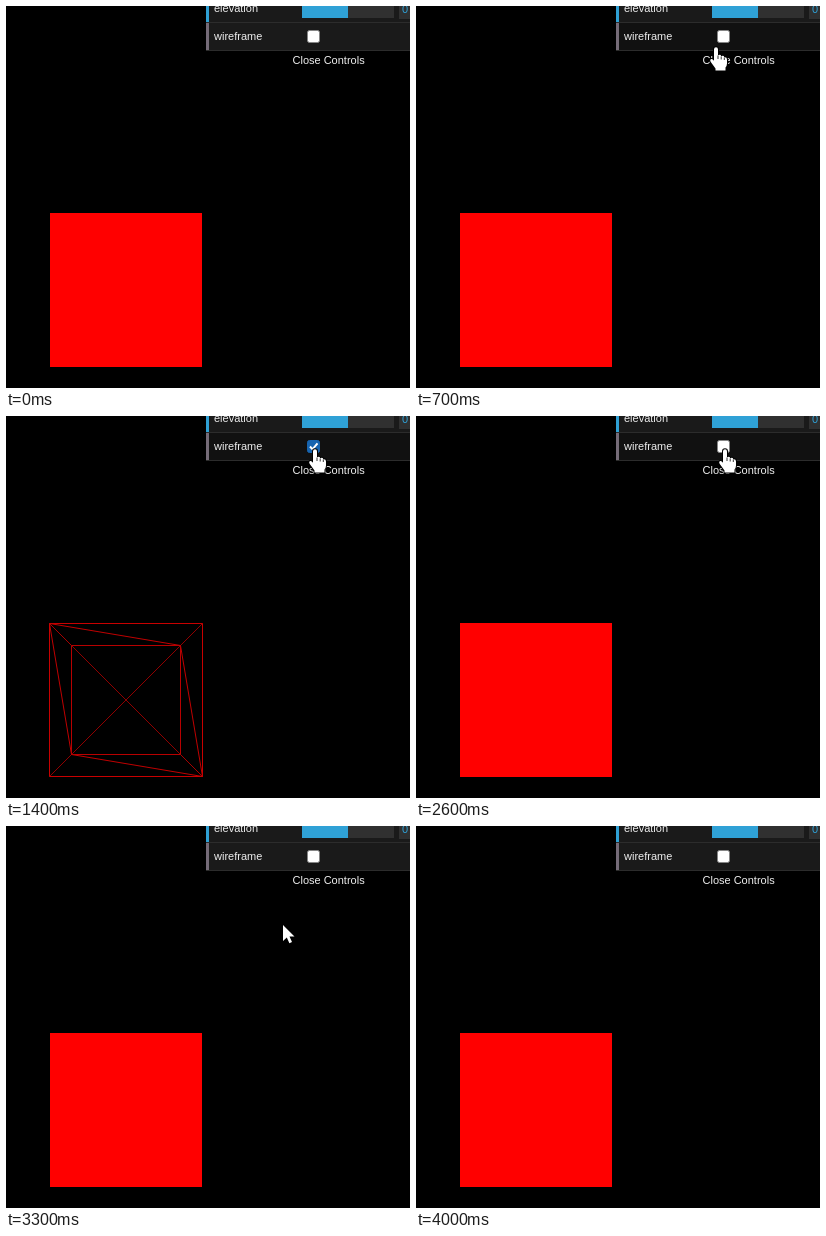
Recreate the animation shown at these times as an HTML page with a canvas. Size 404 by 382 pixels, loop 4.2 s.

```html
<!DOCTYPE html>
<html lang="en">
<head>
<meta charset="utf-8">
<title>Wireframe toggle</title>
<style>
html, body { margin: 0; width: 100%; height: 100%; overflow: hidden; background: #000; }
canvas { display: block; }
</style>
</head>
<body>
<canvas id="stage" width="404" height="382"></canvas>
<script>
const ctx = document.getElementById('stage').getContext('2d');
const LOOP = 4200, STEP = 100;
const CHECK_ON = 1400, CHECK_OFF = 2600;

// Pointer path: time, x, y of the hotspot
const path = [
  [100, 250, 335], [300, 272, 205], [500, 292, 90], [600, 298, 56],
  [700, 300, 42], [900, 304, 37], [1100, 307, 34], [1300, 307, 34],
  [1400, 309, 34], [2900, 309, 34], [3000, 306, 40], [3100, 298, 56],
  [3300, 277, 99], [3500, 260, 150], [3700, 245, 230], [3900, 233, 350]
];

const hand = new Path2D(
  'M-2 1.5Q-2 -.7 0 -.7Q2 -.7 2 1.5V7.2Q4.8 6.2 5.2 8.2Q7.8 7.2 8.3 9.2' +
  'Q11 8.8 11 11.5V15.5Q11 17.5 9.5 19.5V22.5H-.5V20.5L-5.2 14' +
  'Q-6.5 11.7 -4.8 11Q-3.3 10.7 -2 12.7Z');
const knuckles = new Path2D('M2 7.5V11M5.2 8.5V11.5M8.3 9.5V12');
const arrow = new Path2D('M0 0V16L3.8 12.5L6.4 18.2L9 17L6.5 11.5H11.5Z');

function pointerAt(t) {
  const i = path.findIndex(p => p[0] >= t);
  if (i < 0 || t < path[0][0]) return null;
  const b = path[i], a = path[Math.max(0, i - 1)];
  const k = b === a ? 1 : (t - a[0]) / (b[0] - a[0]);
  return { x: a[1] + (b[1] - a[1]) * k, y: a[2] + (b[2] - a[2]) * k };
}

function rect(color, x, y, w, h) {
  ctx.fillStyle = color;
  ctx.fillRect(x, y, w, h);
}

function label(text, x, y, color = '#eee') {
  ctx.font = '11px "Liberation Sans", Arial, sans-serif';
  ctx.fillStyle = color;
  ctx.fillText(text, x, y);
}

function line(color, ...points) {
  ctx.strokeStyle = color;
  ctx.lineWidth = 1;
  ctx.beginPath();
  points.forEach(([x, y]) => ctx.lineTo(x, y));
  ctx.stroke();
}

function drawWireframe() {
  const corners = (l, t, r, b) => [[l, t], [r, t], [r, b], [l, b]];
  const near = corners(43.5, 207.5, 196.5, 360.5);
  const far = corners(65.5, 229.5, 174.5, 338.5);
  line('#900000', far[0], far[2]);
  line('#900000', near[1], near[3]);
  line('#a80000', near[0], far[0]);
  line('#a80000', near[2], far[2]);
  for (const n of [0, 2]) {
    line('#c00000', near[n], far[1]);
    line('#c00000', near[n], far[3]);
  }
  line('#b80000', ...far, far[0]);
  line('#c80000', ...near, near[0]);
}

function drawCheckbox(on) {
  ctx.beginPath();
  ctx.roundRect(301.5, 24.5, 12, 12, 2);
  ctx.fillStyle = on ? '#1664b0' : '#fff';
  ctx.fill();
  ctx.strokeStyle = on ? '#1664b0' : '#858585';
  ctx.lineWidth = 1;
  ctx.stroke();
  if (!on) return;
  ctx.strokeStyle = '#fff';
  ctx.lineWidth = 2;
  ctx.beginPath();
  ctx.moveTo(304, 30.5);
  ctx.lineTo(306.5, 33.3);
  ctx.lineTo(311.5, 27.3);
  ctx.stroke();
}

function drawPanel(on, hover) {
  rect('#1a1a1a', 203, 0, 201, 16);
  rect('#2fa1d6', 200, 0, 3, 16);
  rect('#2c2c2c', 200, 16, 204, 1);
  rect('#303030', 296, 0, 92, 12);
  rect('#2fa1d6', 296, 0, 46, 12);
  rect('#303030', 393, 0, 11, 13);
  label('elevation', 208, 6);
  label('0', 396, 7, '#2fa1d6');

  rect(hover ? '#111' : '#1a1a1a', 203, 17, 201, 27);
  rect('#756b78', 200, 17, 3, 27);
  rect('#2c2c2c', 200, 44, 204, 1);
  label('wireframe', 208, 34);
  drawCheckbox(on);
  label('Close Controls', 286.5, 58);
}

function drawPointer({ x, y }) {
  const overPanel = x > 200 && y < 62;
  const shape = overPanel ? hand : arrow;
  ctx.save();
  ctx.translate(x, y);
  ctx.lineJoin = 'round';
  ctx.strokeStyle = '#000';
  ctx.lineWidth = overPanel ? 2 : 1;
  ctx.stroke(shape);
  ctx.fillStyle = '#fff';
  ctx.fill(shape);
  if (overPanel) {
    ctx.lineWidth = 0.8;
    ctx.stroke(knuckles);
  }
  ctx.restore();
}

function draw(t) {
  const on = t >= CHECK_ON && t < CHECK_OFF;
  const p = pointerAt(t);
  rect('#000', 0, 0, 404, 382);
  if (on) drawWireframe();
  else rect('#f00', 44, 207, 152, 154);
  drawPanel(on, p && p.x > 200 && p.y >= 17 && p.y < 45);
  if (p) drawPointer(p);
}

const start = performance.now();
function tick() {
  const t = (performance.now() - start) % LOOP;
  draw(Math.floor(t / STEP) * STEP);
  requestAnimationFrame(tick);
}
tick();
</script>
</body>
</html>
```
